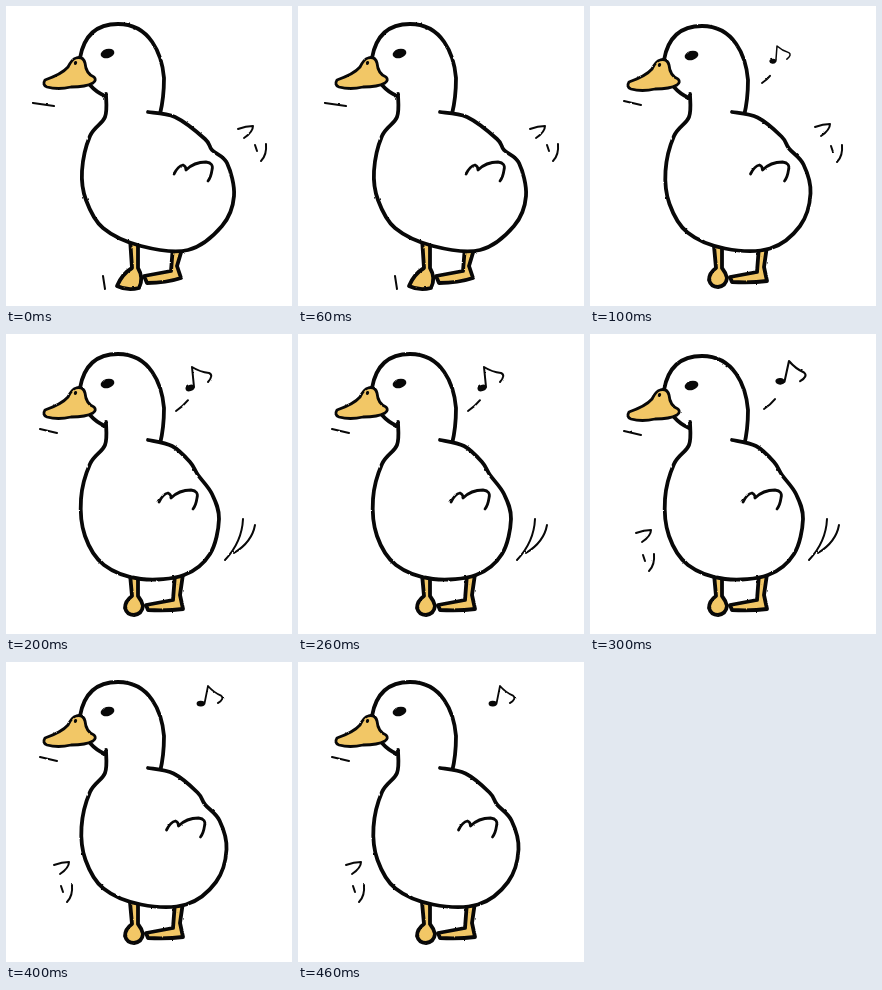
Recreate the animation shown at these times as an HTML page. Size 286 by 300 pixels, loop 500 ms.

```html
<!DOCTYPE html>
<html lang="ja">
<head>
<meta charset="utf-8">
<title>Duck</title>
<style>
html, body { margin: 0; width: 100%; height: 100%; overflow: hidden; background: #fff; }
svg { display: block; width: 100vw; height: 100vh; }
path { fill: none; stroke: #080808; stroke-linecap: round; stroke-linejoin: round; }
.bold { stroke-width: 3.8; }
.mid { stroke-width: 2.8; }
.thin { stroke-width: 2; }
.white { fill: #fff; }
.gold { fill: #f2c766; }
</style>
</head>
<body>
<svg viewBox="0 0 286 300">
  <filter id="rough" filterUnits="userSpaceOnUse" x="0" y="0" width="286" height="300" color-interpolation-filters="sRGB">
    <feTurbulence type="fractalNoise" baseFrequency=".2" numOctaves="2" seed="4"/>
    <feDisplacementMap in="SourceGraphic" scale="1.8" xChannelSelector="R" yChannelSelector="G"/>
  </filter>
  <g id="art" filter="url(#rough)"></g>
</svg>
<script>
const STEP = 100;
const art = document.getElementById('art');

// lean: body sway, 0 left to 1 right; drop: how far the head sinks
const poses = [
  { lean: 1, drop: 0, fu: [232, 119], ri: [249, 138], stepping: true },
  { lean: .5, drop: 2, fu: [225, 117], ri: [241, 139], note: [187, 40, 10, .75], glint: [172, 77, 8] },
  { lean: 0, drop: 2, note: [186, 33, 0, 1], glint: [170, 77, 12], swoosh: true },
  { lean: 0, drop: 4, fu: [46, 195], ri: [53, 220], note: [199, 27, 18, 1.05], glint: [174, 75, 11], swoosh: true },
  { lean: .5, drop: 2, fu: [48, 199], ri: [55, 223], note: [202, 24, 17, .9] }
];

// Body outline: x, y when leaning left, then the shift when leaning right
const bodyKeys = [
  [100, 88, 0, 0], [99, 111, 0, 0], [84, 130, 0, 0], [75, 165, 1, 0], [79, 202, 1, -8],
  [98, 231, -1, -9], [135, 245, 0, -5], [178, 241, 4, 3], [204, 220, 12, 0], [213, 185, 15, 5],
  [206, 160, 15, -3], [192, 141, 14, 3], [184, 128, 15, 5], [166, 112, 3, -1], [142, 106, 0, 0]
];

function add(parent, tag, attrs) {
  const el = document.createElementNS('http://www.w3.org/2000/svg', tag);
  for (const k in attrs) el.setAttribute(k, attrs[k]);
  return parent.appendChild(el);
}

const group = (parent, transform = '') => add(parent, 'g', { transform });
const shape = (g, cls, d) => add(g, 'path', { class: cls, d });
const dot = (g, cx, cy, rx, ry, turn) =>
  add(g, 'ellipse', { cx, cy, rx, ry, fill: '#080808', transform: `rotate(${turn} ${cx} ${cy})` });

// Smooth curve through points
function curve(p) {
  let d = 'M' + p[0];
  for (let i = 0; i < p.length - 1; i++) {
    const a = p[i - 1] || p[i], b = p[i], c = p[i + 1], e = p[i + 2] || c;
    const h1 = b.map((v, k) => v + (c[k] - a[k]) / 6);
    const h2 = c.map((v, k) => v - (e[k] - b[k]) / 6);
    d += `C${h1} ${h2} ${c}`;
  }
  return d;
}

function feet(g, stepping) {
  shape(g, 'bold gold', stepping
    ? 'M167 240L165 265L138 270L141 277Q160 277 175 272L171 260L177 240Z'
    : 'M169 240L167 266L140 271L142 276Q162 277 177 275L174 261L177 240Z');
  shape(g, 'bold gold', stepping
    ? 'M124 232L126 262Q116 268 111 280Q121 285 133 282Q138 272 132 262L132 232Z'
    : 'M124 240L126 262Q119 267 119 274Q121 281 128 281Q136 280 137 272Q136 267 132 262L132 240Z');
}

function head(g) {
  shape(g, 'bold white', 'M74 52C78 29 91 18 112 18C144 18 156 48 158 72Q158 92 154 108');
  shape(g, 'bold', 'M84 79Q90 86 99 90');
  shape(g, 'mid gold', 'M70 52Q66 53 62 61Q56 68 39 74Q36 79 41 81Q52 84 65 81Q80 81 87 77Q91 74 88 71Q80 68 79 57Q77 50 70 52Z');
  dot(g, 101.5, 47.5, 7, 4.6, -15);
  dot(g, 69.5, 57, 1.6, 2, 20);
}

function body(g, lean) {
  shape(g, 'bold white', curve(bodyKeys.map(([x, y, dx, dy]) => [x + dx * lean, y + dy * lean])));
}

const wing = g => shape(g, 'mid', 'M153 168Q157 160 162 159Q165 160 165 164Q173 156 185 156Q193 157 191 164Q190 171 187 175');

const fu = g => shape(g, 'thin', 'M0 4Q8 1 15 1Q15 7 6 13');
const ri = g => shape(g, 'thin', 'M0 1L2 7M11 0Q12 11 6 17');

function note(g) {
  dot(g, -2, 21, 4.6, 3.2, -15);
  shape(g, 'thin', 'M2 20L0 0Q8 5 17 6Q22 8 16 15');
}

poses.forEach((pose, i) => {
  const g = group(art);
  const at = ([x, y, turn = 0, size = 1]) => group(g, `translate(${x} ${y}) rotate(${turn}) scale(${size})`);

  feet(g, pose.stepping);
  head(at([0, pose.drop]));
  body(g, pose.lean);
  wing(at([15 * pose.lean, 0]));

  if (pose.fu) fu(at(pose.fu));
  if (pose.ri) ri(at(pose.ri));
  if (pose.note) note(at(pose.note));
  if (pose.glint) {
    const [x, y, len] = pose.glint;
    shape(g, 'thin', `M${x} ${y}q${len * .6} ${-len * .4} ${len} ${-len * .9}`);
  }
  if (pose.swoosh) shape(g, 'thin', 'M237 185Q236 208 219 226M249 191Q246 208 228 219');
  shape(g, 'thin', pose.stepping ? 'M27 97l21 3M97 270l2 13' : `M34 ${93 + pose.drop}l17 4`);

  const keys = [...poses, poses[0]].map((_, k) => ({ opacity: +(k === i), easing: 'step-end' }));
  g.animate(keys, { duration: STEP * poses.length, iterations: Infinity }).startTime = 0;
});
</script>
</body>
</html>
```
